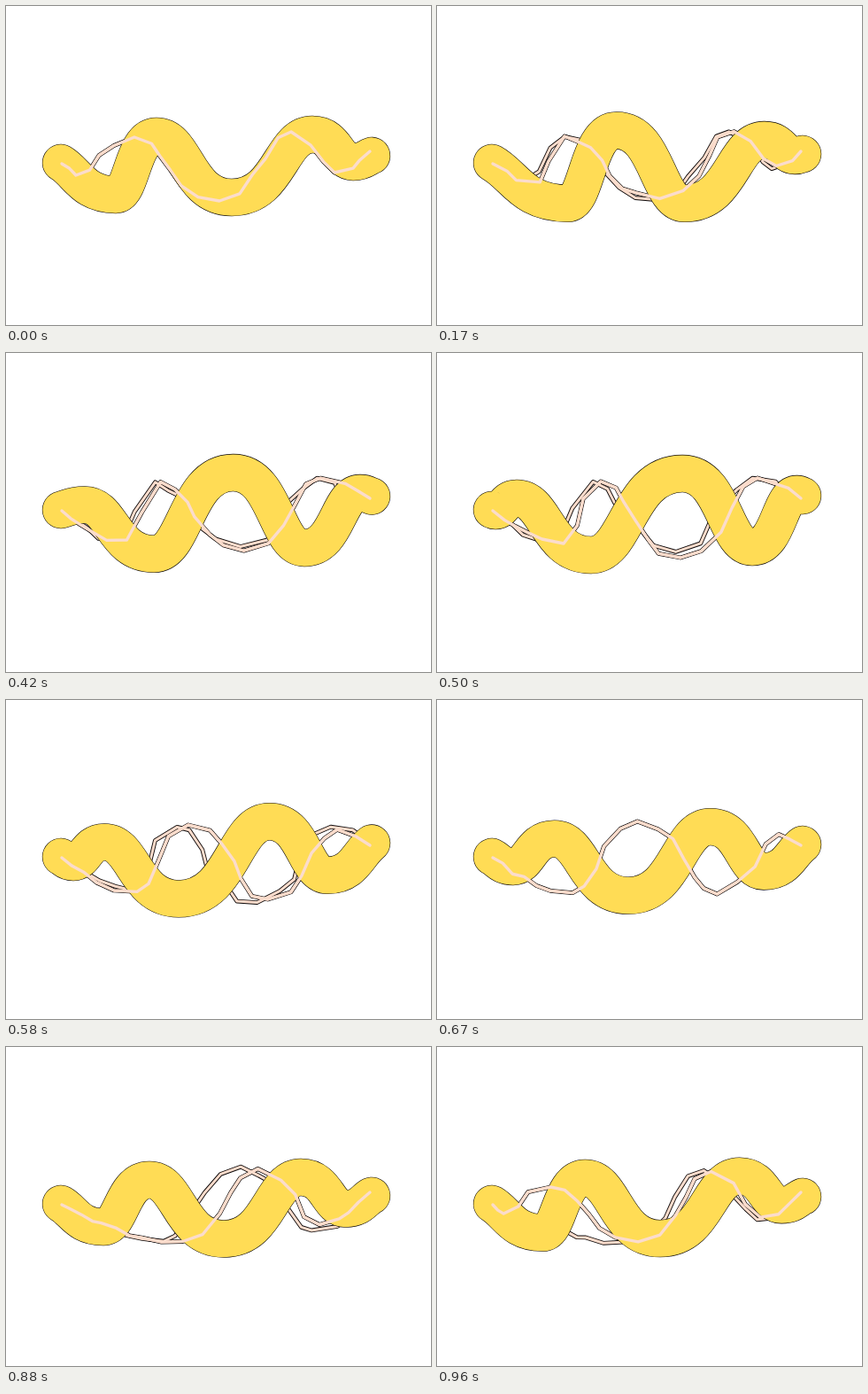
Recreate the animation shown at these times as an HTML page with a canvas. Size 480 by 360 pixels, loop 1 s.

```html
<!DOCTYPE html>
<html lang="en">
<head>
<meta charset="utf-8">
<title>Electric worm</title>
<style>
html, body { margin: 0; width: 100%; height: 100%; overflow: hidden; background: #fff; }
canvas { display: block; width: 480px; height: 360px; }
</style>
</head>
<body>
<canvas id="stage"></canvas>
<script>
const LOOP = 1000, STEPS = 24, MIDDLE = 240;
const YELLOW = '#ffdc55', PINK = '#fbdccc', INK = '#0c0808';
const canvas = document.getElementById('stage');
const ctx = canvas.getContext('2d');
const ratio = window.devicePixelRatio || 1;
canvas.width = 480 * ratio;
canvas.height = 360 * ratio;
ctx.scale(ratio, ratio);
ctx.lineJoin = ctx.lineCap = 'round';

// Every bend travels from tail to head over several loops: age in s, x, y
const wormBends = [
  [[.33, 88, 179], [.5, 90, 164], [.75, 154, 153], [1, 170, 147], [1.33, 235, 134],
   [1.58, 297, 137], [1.75, 320, 149], [2, 346, 145], [2.33, 393, 157], [2.58, 413, 160]],
  [[.5, 66, 178], [.75, 96, 193], [1, 124, 213], [1.17, 148, 223], [1.5, 174, 228], [1.75, 237, 217],
   [2, 255, 216], [2.17, 280, 223], [2.5, 356, 219], [2.58, 363, 198], [3, 392, 176], [3.33, 416, 162]]
];
const boltBends = [
  [[.95, 125, 160], [1, 145, 148], [1.17, 144, 147], [1.5, 185, 145],
   [1.75, 247, 133], [2, 322, 142], [2.5, 362, 141], [2.8, 405, 160]],
  [[.9, 70, 184], [1, 79, 191], [1.17, 117, 199], [1.5, 143, 215], [1.75, 158, 219], [2, 241, 220],
   [2.33, 262, 215], [2.5, 275, 231], [2.75, 337, 213], [3, 371, 188], [3.4, 400, 170]]
];

const mix = (a, b, f) => a.map((v, i) => v + (b[i] - v) * f);

function noise(seed) {
  const v = Math.sin(seed * 12.9898) * 43758.5453;
  return (v - Math.floor(v)) * 2 - 1;
}

function track(keys, age) {
  const i = keys.findIndex(k => k[0] > age);
  const a = keys[i - 1], b = keys[i];
  return mix(a, b, (age - a[0]) / (b[0] - a[0])).slice(1);
}

// Cubic segments from tail to head, level at every bend
function curve(bends, t, start, end) {
  const mid = [];
  for (const keys of bends) {
    const first = keys[0][0], last = keys[keys.length - 1][0];
    for (let age = t; age < last; age++) {
      if (age >= first) mid.push(track(keys, age));
    }
  }
  const inside = mid.filter(p => p[0] > start[0] + 1 && p[0] < end[0] - 1);
  const all = [start, ...inside.sort((a, b) => a[0] - b[0]), end];
  return all.slice(1).map((b, i) => {
    const a = all[i], dx = b[0] - a[0];
    // bends are rounder on the side that faces the middle
    const pull = a[0] + b[0] > 2 * MIDDLE ? .6 : .4;
    const c1 = i === 0 ? mix(a, b, .3) : [a[0] + dx * pull, a[1]];
    const c2 = i === all.length - 2 ? mix(b, a, .3) : [b[0] - dx * (1 - pull), b[1]];
    return [a, c1, c2, b];
  });
}

function smooth(segments) {
  const path = new Path2D();
  path.moveTo(...segments[0][0]);
  for (const [, c1, c2, b] of segments) path.bezierCurveTo(...c1, ...c2, ...b);
  return path;
}

function crackle(segments, seed, size) {
  const path = new Path2D();
  path.moveTo(...segments[0][0]);
  for (const [a, c1, c2, b] of segments) {
    const parts = Math.max(2, Math.round((b[0] - a[0]) / 16));
    for (let i = 1; i <= parts; i++) {
      const f = i / parts;
      const ab = mix(a, c1, f), bc = mix(c1, c2, f), cd = mix(c2, b, f);
      const [x, y] = mix(mix(ab, bc, f), mix(bc, cd, f), f);
      const shake = i < parts ? size : 0;
      path.lineTo(x + noise(seed++) * shake, y + noise(seed++) * shake);
    }
  }
  return path;
}

function stroke(path, width, color) {
  ctx.lineWidth = width;
  ctx.strokeStyle = color;
  ctx.stroke(path);
}

function draw(n) {
  const t = n / STEPS;
  const worm = smooth(curve(wormBends, t, [62, 177], [413, 165 + 4 * Math.cos(2 * Math.PI * t)]));
  const strand = (time, seed, size) => crackle(curve(boltBends, time, [63, 178], [411, 164]), seed, size);
  // a second strand lags behind the first and rejoins it three times per loop
  const lag = .07 * Math.abs(Math.sin(3 * Math.PI * t));
  const bolt = strand(t, n * 90 + 1, 3);
  const echo = lag > .01 ? [strand((t - lag + 1) % 1, n * 90 + 51, 5)] : [];

  ctx.fillStyle = '#fff';
  ctx.fillRect(0, 0, 480, 360);
  for (const p of [bolt, ...echo]) stroke(p, 4.8, INK);
  for (const p of [bolt, ...echo]) stroke(p, 3, PINK);
  stroke(worm, 42.4, INK);
  stroke(worm, 41.3, YELLOW);
  stroke(bolt, 3.4, PINK);
}

function stepAt(time) {
  let n = STEPS - 1;
  while (Math.round(n * 100 / STEPS) * 10 > time) n--;
  return n < 8 ? n - n % 2 : n; // the first third runs on twos
}

let shown = -1;
function tick() {
  const n = stepAt(performance.now() % LOOP);
  if (n !== shown) draw(shown = n);
  requestAnimationFrame(tick);
}
tick();
</script>
</body>
</html>
```
